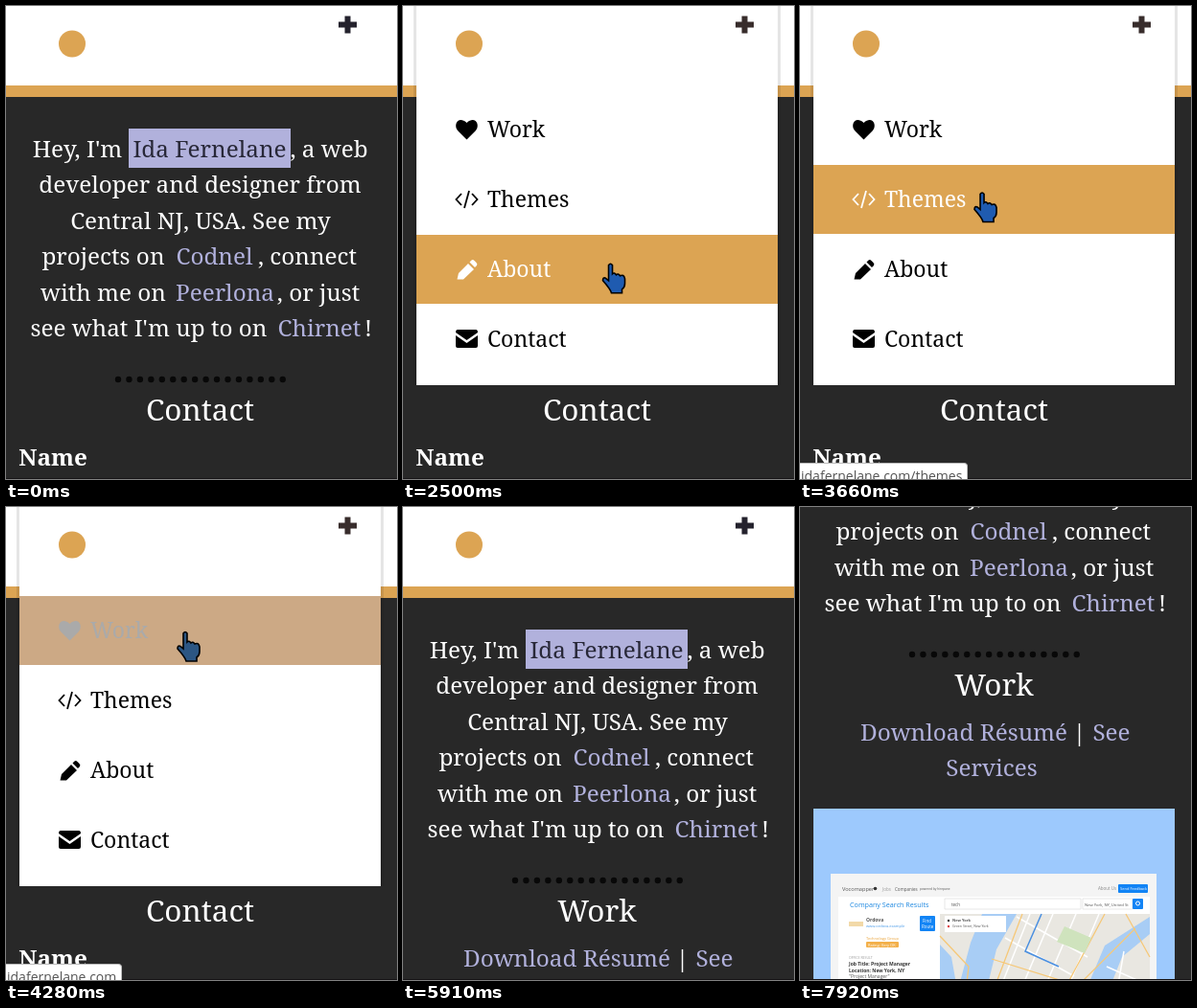
Recreate the animation shown at these times as an HTML page. Size 408x494 px, loop 7.99 s.

```html
<!DOCTYPE html>
<html lang="en">
<head>
<meta charset="utf-8">
<title>Portfolio menu</title>
<style>
html, body { margin: 0; width: 100%; height: 100%; overflow: hidden; background: #282828; }
svg { display: block; width: 100%; height: 100%; font: 24.3px "Noto Serif", serif; }
.copy { fill: #fff; text-anchor: middle; }
.link { fill: #b1b1dc; }
.heading { font-size: 31.5px; }
.row { color: #000; }
.row rect { fill: none; }
.row text, .row path { fill: currentColor; }
.row text { font-size: 23px; }
.row .line { fill: none; stroke: currentColor; stroke-width: 1.8; }
.row.hover { color: #fff; }
.row.hover rect { fill: #dca453; }
.row.active { color: #aaa; }
.row.active rect { fill: #cca985; }
.shot { font: 5px "Open Sans", sans-serif; fill: #555; }
#status { position: absolute; left: 0; bottom: 0; box-sizing: border-box; height: 17px; overflow: hidden;
  padding: 3px 5px 0 1px; border: solid #bbb; border-width: 1px 1px 0 0; border-radius: 0 4px 0 0;
  background: #fff; color: #555; font: 14px/20px "Open Sans", sans-serif; white-space: nowrap; }
</style>
</head>
<body>
<svg viewBox="0 0 408 494">
  <defs>
    <circle id="logo" cx="69" cy="39.5" r="14" fill="#dca453"/>
    <path id="plus" d="M353.5 10.5h6v6h6.500v6h-6.500v6h-6v-6h-6.500v-6h6.500z"/>
  </defs>

  <g id="page">
    <rect width="408" height="1000" fill="#282828"/>
    <rect width="408" height="83" fill="#fff"/>
    <rect y="83" width="408" height="12" fill="#dca453"/>
    <use href="#logo" id="pageLogo"/>
    <use href="#plus" class="plus"/>
    <g class="copy">
      <rect x="128" y="128" width="169" height="41" fill="#b1b1dc"/>
      <text x="74.5" y="158">Hey, I'm</text>
      <text x="212.5" y="158" fill="#282838">Ida Fernelane</text>
      <text x="337" y="158">, a web</text>
      <text x="202.5" y="195">developer and designer from</text>
      <text x="203" y="233">Central NJ, USA. See my</text>
      <text x="101.5" y="270">projects on</text>
      <text x="217.5" y="270" class="link">Codnel</text>
      <text x="314.5" y="270">, connect</text>
      <text x="101.5" y="308">with me on</text>
      <text x="228.5" y="308" class="link">Peerlona</text>
      <text x="326" y="308">, or just</text>
      <text x="149" y="345">see what I'm up to on</text>
      <text x="327" y="345" class="link">Chirnet</text>
      <text x="378" y="345">!</text>
    </g>
    <path d="M117 390H290" stroke="#080808" stroke-width="6.4" stroke-linecap="round" stroke-dasharray="0 11.45"/>
    <g id="contact" class="copy">
      <text x="202.5" y="433" class="heading">Contact</text>
      <text x="49" y="480" font-weight="bold">Name</text>
    </g>
    <g id="work" class="copy">
      <text x="202.5" y="433" class="heading">Work</text>
      <text x="171" y="480" class="link">Download Résumé</text>
      <text x="291.5" y="480">|</text>
      <text x="325" y="480" class="link">See</text>
      <text x="200" y="517" class="link">Services</text>
      <g class="shot" transform="translate(0 236)" text-anchor="start">
        <rect x="14" y="315" width="377" height="300" fill="#9dc9fd"/>
        <rect x="32" y="383" width="340" height="200" fill="#f4f4f4"/>
        <rect x="40" y="407" width="325" height="180" fill="#fff"/>
        <text x="44" y="401" font-size="5.6">Vocomapper</text>
        <circle cx="78.5" cy="398.5" r="1.8" fill="#333"/>
        <text x="86" y="401" font-size="4.5" fill="#999">Jobs</text>
        <text x="99" y="401" font-size="4.5">Companies</text>
        <text x="125" y="400" font-size="3.2">powered by hirepane</text>
        <text x="311" y="400" font-size="4.5" fill="#888">About Us</text>
        <rect x="332" y="394" width="31" height="9" rx="1" fill="#1284f5"/>
        <text x="334" y="400" font-size="4" fill="#fff">Send Feedback</text>
        <text x="52" y="417.5" font-size="7.2" fill="#1a86e0">Company Search Results</text>
        <path d="M151 409h142v11h-142zM295 409h52v11h-52z" fill="#fff" stroke="#ddd" stroke-width=".7"/>
        <text x="158" y="416.5" font-size="4.5">tech</text>
        <text x="297" y="416.5" font-size="4.2">New York, NY, United St</text>
        <rect x="347" y="409" width="11" height="11" rx="1" fill="#1284f5"/>
        <circle cx="352.5" cy="414" r="2" fill="none" stroke="#fff"/>
        <rect x="51" y="433" width="15" height="5" fill="#f2d9a8"/>
        <text x="69" y="433" font-weight="bold">Ordova</text>
        <text x="69" y="439" font-size="4" fill="#4a9be8">www.ordova.example</text>
        <text x="69" y="452" font-size="4" fill="#e9a33a">Technology Group</text>
        <rect x="69" y="454" width="34" height="6" rx="1" fill="#f3b04a"/>
        <text x="71" y="459" font-size="4" fill="#fff">Rating: Very OK</text>
        <rect x="125" y="427" width="16" height="16" rx="1" fill="#1284f5"/>
        <text x="128" y="434" font-size="4.5" fill="#fff">Find</text>
        <text x="127" y="440" font-size="4.5" fill="#fff">Route</text>
        <text x="51" y="472" font-size="3.5" fill="#999">OFFICE RESULT</text>
        <g font-weight="bold" fill="#333">
          <text x="51" y="479">Job Title: Project Manager</text>
          <text x="51" y="486">Location: New York, NY</text>
        </g>
        <text x="51" y="492">"Project Manager"</text>
        <rect x="146" y="425" width="219" height="90" fill="#e9e7e1"/>
        <path d="M146 457L158 470L166 515H146ZM190 425L178 455L162 515H192L205 462L226 425ZM365 428L318 458L294 515H318L336 470L365 446Z" fill="#a8cdf5"/>
        <path d="M226 428L300 470M214 450L286 490M240 425L206 510M264 425L228 510M288 425L252 510M312 425L276 510M320 480L365 500M338 464L330 510" fill="none" stroke="#fff" stroke-width="1.5"/>
        <path d="M146 448L176 480L172 515M232 425L198 515M200 472L290 500L350 440M318 425L270 515M340 425L365 470" fill="none" stroke="#f6c878" stroke-width="1.3"/>
        <path d="M252 425L235 464L270 480" fill="none" stroke="#4a8fe0" stroke-width="1.5"/>
        <path d="M276 438L304 450L297 466L268 454Z" fill="#cfe3bd"/>
        <rect x="151" y="427" width="64" height="17" fill="#fff"/>
        <circle cx="155" cy="432" r="1.2" fill="#333"/>
        <circle cx="155" cy="438" r="1.2" fill="#d44"/>
        <text x="159" y="433" font-size="4" font-weight="bold">New York</text>
        <text x="159" y="439" font-size="3.5">Green Street, New York</text>
      </g>
    </g>
  </g>

  <g id="menu">
    <path d="M11 0h3v396h-3zM391 0h3v396h-3z" fill="#000" opacity=".1"/>
    <rect x="14" width="377" height="396" fill="#fff"/>
    <use href="#logo"/>
    <use href="#plus" class="plus"/>
    <g class="row" transform="translate(0 93)">
      <rect x="14" width="377" height="72"/>
      <path d="M66.5 46.5L57 37C52 31 58 21 66.5 29C75 21 81 31 76 37Z"/>
      <text x="88" y="44">Work</text>
    </g>
    <g class="row" transform="translate(0 166)">
      <rect x="14" width="377" height="72"/>
      <path class="line" d="M61 30L55.5 36L61 42M72 30L77.5 36L72 42M69 27L64 45"/>
      <text x="88" y="44">Themes</text>
    </g>
    <g class="row" transform="translate(0 239)">
      <rect x="14" width="377" height="72"/>
      <path d="M56.5 46.5L58 40L68 30L74 36L63 46.5ZM69.5 28.5l2-2q1.5-1 3 .5l2 2q1.5 1.5 .5 3l-2 2z"/>
      <text x="88" y="44">About</text>
    </g>
    <g class="row" transform="translate(0 311)">
      <rect x="14" width="377" height="73"/>
      <path d="M57 27h19q2 0 2 3l-11.5 8L55 30q0-3 2-3zM55 33l11.5 8L78 33v11q0 2-2 2H57q-2 0-2-2z"/>
      <text x="88" y="45">Contact</text>
    </g>
  </g>

  <rect id="blank" width="408" height="494" fill="#fff"/>
  <g id="cursor">
    <path id="arrow" d="M0 0V26L6 20.5L10.5 30.5L15.5 28L11 18.5H18.5Z"/>
    <path id="hand" d="M-2 2Q0-1 2 2V11Q4 9 6 12Q8 10 10 13Q14 11 15 16V21Q15 25 12 27V31H1Q0 27-8 18Q-8 14-5 15.5L-2 18Z" stroke="#000" stroke-width="1.6"/>
  </g>
  <rect y="493" width="408" height="1" fill="#151315"/>
</svg>
<div id="status"></div>

<script>
const LOOP = 7990, STEP = 73.5;
const $ = id => document.getElementById(id);
const rows = document.querySelectorAll('.row');
const pluses = document.querySelectorAll('.plus');
const paths = ['', '/themes', '/about', '/contact'];

// time, x, y of the pointer tip
const route = [
  [260, 395, 470], [480, 252, 260], [880, 356, 21], [1799, 356, 21],
  [1800, 225, 50], [2580, 215, 308], [2950, 204, 362], [3270, 196, 300],
  [3430, 192, 236], [3960, 187, 130], [5050, 187, 130], [5510, 300, 500]
];

function pointerAt(t) {
  const i = route.findIndex(p => p[0] > t);
  if (i < 0) return route[route.length - 1].slice(1);
  if (i === 0) return route[0].slice(1);
  const [a, b] = [route[i - 1], route[i]];
  const k = (t - a[0]) / (b[0] - a[0]);
  return [a[1] + (b[1] - a[1]) * k, a[2] + (b[2] - a[2]) * k];
}

const within = (t, from, to) => t >= from && t < to;
const show = (id, on) => { $(id).style.display = on ? '' : 'none'; };

function menuOpacity(t) {
  if (!within(t, 1260, 4500)) return 0;
  if (t < 1340) return 0.5;
  return t < 4360 ? 1 : t < 4430 ? 0.66 : 0.33;
}

function draw(t) {
  const tick = 1800 + Math.floor((t - 1800) / STEP) * STEP;
  const [x, y] = pointerAt(tick);
  const hoverY = pointerAt(tick - STEP)[1];   // hover trails the pointer
  const row = within(t, 1880, 5050) ? Math.floor((hoverY - 93) / 72.7) : -1;
  const pressed = t >= 4280;

  const scroll = t < 7220 ? 0 : 23.6 * (Math.floor((t - 7220) / 77.7) + 1);
  $('page').setAttribute('transform', `translate(0 ${-Math.round(scroll)})`);
  show('contact', t < 5280);
  show('work', t >= 5280);
  show('blank', within(t, 5280, 5660));
  show('pageLogo', !within(t, 5280, 5910));

  $('menu').style.opacity = menuOpacity(t);
  rows.forEach((el, i) => {
    el.setAttribute('class', 'row' + (i === row ? (pressed ? ' active' : ' hover') : ''));
  });
  pluses.forEach(p => p.setAttribute('fill', within(t, 1110, 5280) ? '#382d2c' : '#24222d'));

  const hand = within(t, 820, 1800) || (within(t, 1800, 5050) && y >= 93);
  show('cursor', within(t, 260, 5510));
  show('hand', hand);
  show('arrow', !hand);
  $('hand').setAttribute('fill', pressed ? '#2c5683' : '#1f5bb0');
  $('cursor').setAttribute('transform', `translate(${x} ${y})`);

  show('status', within(t, 2660, 5910));
  $('status').textContent = t < 4670 ? 'idafernelane.com' + (paths[row] || '') : 'Waiting for cache...';
}

function frame(now) {
  draw(now % LOOP);
  requestAnimationFrame(frame);
}
requestAnimationFrame(frame);
</script>
</body>
</html>
```
